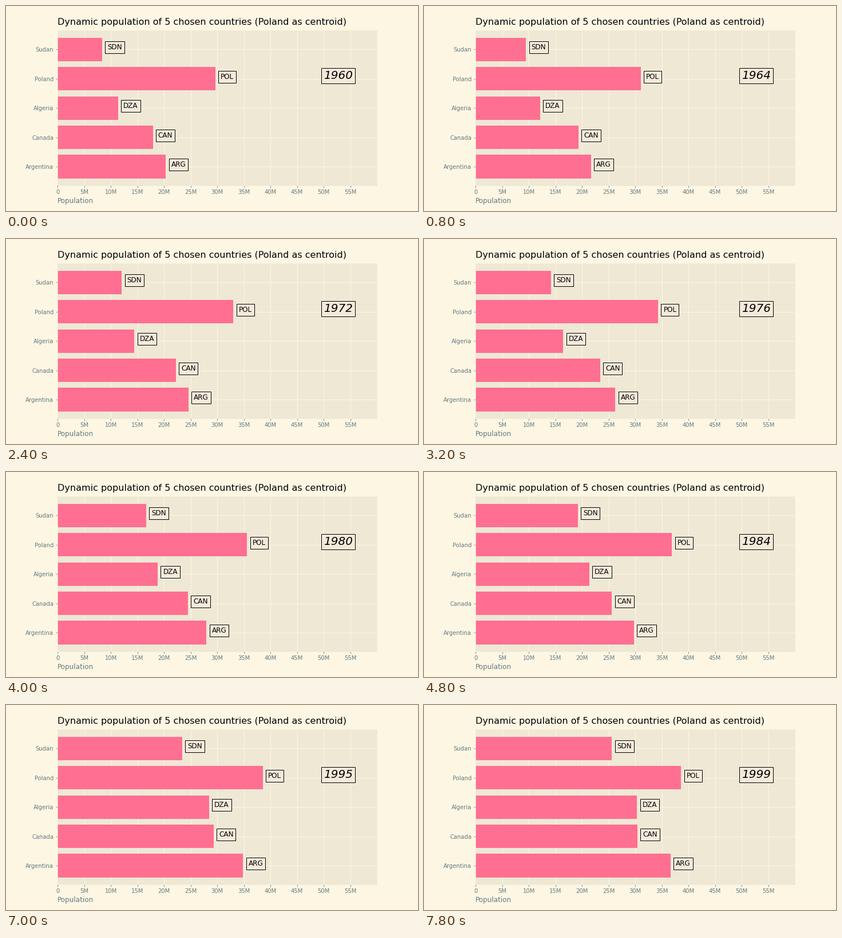
These frames come from a looping animation (720x360 px, 8000 ms). A matplotlib script:

```python
import matplotlib.pyplot as plt
import numpy as np
from matplotlib.animation import FuncAnimation

START, STEPS, STEP_MS = 1960, 40, 200
GAP = 6  # years between key values
BAR, BOX = "#ff6f91", "#f4eadb"

# Millions of people, one key value every GAP years
COUNTRIES = {
    "Argentina": ("ARG", [20.35, 22.41, 24.61, 27.13, 29.76, 32.64, 35.30, 38.0]),
    "Canada": ("CAN", [17.91, 20.05, 22.22, 23.96, 25.61, 27.69, 29.61, 31.2]),
    "Algeria": ("DZA", [11.39, 12.61, 14.44, 17.63, 21.39, 25.52, 28.98, 31.6]),
    "Poland": ("POL", [29.64, 31.68, 33.06, 34.97, 36.90, 38.11, 38.62, 38.6]),
    "Sudan": ("SDN", [8.36, 10.08, 12.09, 15.33, 19.20, 21.10, 23.93, 27.4]),
}


def population(keys, step):
    """Smooth cubic curve through the key values."""
    k, rest = divmod(step, GAP)
    t = rest / GAP
    slope = np.gradient(keys)
    rise = keys[k + 1] - keys[k]
    bend = (1 - t) * (slope[k] - rise) - t * (slope[k + 1] - rise)
    return keys[k] + t * rise + t * (1 - t) * bend


def boxed(x, y, text, **style):
    return ax.text(x, y, text, color="black",
                   bbox=dict(facecolor=BOX, edgecolor="black"), **style)


plt.style.use("Solarize_Light2")
fig, ax = plt.subplots(figsize=(10, 5), dpi=72)
fig.subplots_adjust(left=0.125, right=0.9, bottom=0.125, top=0.88)

bars = ax.barh(list(COUNTRIES), [keys[0] for _, keys in COUNTRIES.values()],
               color=BAR)
labels = [boxed(keys[0] + 1, row, code, fontsize=12)
          for row, (code, keys) in enumerate(COUNTRIES.values())]
year_label = boxed(50, 3, str(START), fontsize=20, style="italic")

ticks = range(0, 60, 5)
ax.set_xlim(0, 60)
ax.set_xticks(ticks, [f"{t}M" if t else "0" for t in ticks])
ax.set_xlabel("Population", loc="left")
ax.set_title("Dynamic population of 5 chosen countries (Poland as centroid)",
             loc="left", color="black", pad=10)


def update(step):
    for bar, label, (_, keys) in zip(bars, labels, COUNTRIES.values()):
        size = population(keys, step)
        bar.set_width(size)
        label.set_x(size + 1)
    year_label.set_text(str(START + step))
    return [*bars, *labels, year_label]


anim = FuncAnimation(fig, update, frames=STEPS, interval=STEP_MS,
                     repeat=True, repeat_delay=0)
plt.show()
```
